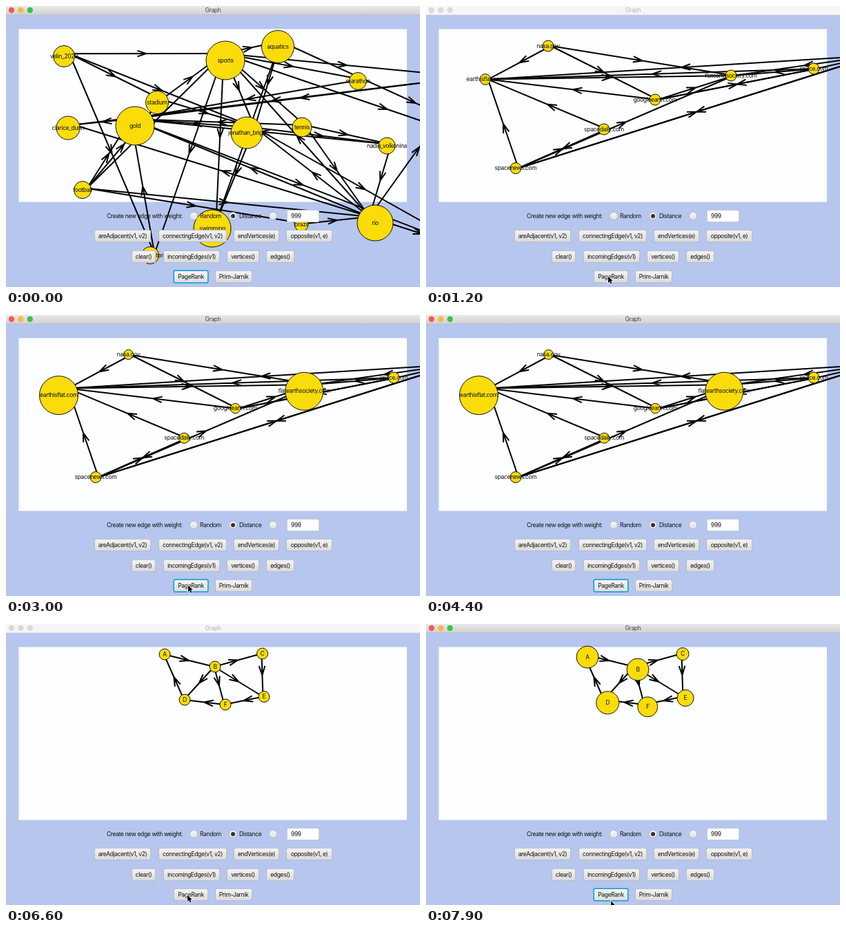
Write an HTML page with a canvas that moves like this. It is 600 px wide and 408 px high and loops after 8 s.

```html
<!DOCTYPE html>
<html lang="en">
<head>
<meta charset="utf-8">
<title>Graph</title>
<style>
html, body { margin: 0; width: 100%; height: 100%; overflow: hidden; background: #b6c6ee; }
canvas { display: block; width: 600px; height: 408px; }
</style>
</head>
<body>
<canvas id="stage"></canvas>
<script>
const W = 600, H = 408, LOOP = 8000, TAU = Math.PI * 2;
const canvas = document.getElementById('stage');
const ctx = canvas.getContext('2d');
const ratio = window.devicePixelRatio || 1;
canvas.width = W * ratio;
canvas.height = H * ratio;

// Node: label, x, y, radius, then optionally the radius once ranked.
// Nodes without a radius lie outside the window.
const sportsWeb = {
  nodes: {
    games: ['velin_2020', 84, 73, 15.5], sports: ['sports', 318, 79, 28],
    aquatics: ['aquatics', 394, 59, 23.5], marathon: ['marathon', 510, 109, 12.5],
    stadium: ['stadium', 219, 140, 16.5], gold: ['gold', 187, 174, 28],
    gymnast: ['clarice_dunn', 90, 177, 17], swimmer: ['jonathan_brigs', 349, 184, 23],
    tennis: ['tennis', 429, 176, 14], player: ['nadia_volkonina', 552, 203, 12],
    football: ['football', 111, 267, 12.5], swimming: ['swimming', 299, 323, 27],
    brazil: ['brazil', 428, 317, 10], rio: ['rio', 535, 315, 26],
    court: ['badminton', 209, 362, 12.5],
    p: ['', 672, 103], q: ['', 790, 231], s: ['', 680, 356]
  },
  edges: `games>sports games>stadium games>swimmer games>court stadium>swimmer
    stadium>sports football>stadium football>gold football>sports football>rio
    football>brazil court>gold sports>court sports>swimming sports>aquatics
    aquatics>swimming aquatics>swimmer swimmer>swimming gold>gymnast rio>gymnast
    p>gold p>gymnast swimmer>gold tennis>gold player>gold tennis>player
    swimmer>player rio>gold gold>s rio>sports sports>swimmer sports>tennis
    sports>marathon sports>p sports>q aquatics>q marathon>gold rio>swimmer
    swimmer>s tennis>rio player>rio rio>p rio>s brazil>rio`
};

const spaceWeb = {
  nodes: {
    nasa: ['nasa.gov', 177, 58, 8, 7], earth: ['earthisflat.com', 86, 106.5, 7.8, 28],
    google: ['googleearth.com', 332, 136, 8, 7.2],
    flat: ['flatearthsociety.com', 442, 101, 8, 27.5],
    space: ['space.com', 562, 91, 8], daily: ['spacedaily.com', 258, 179, 8, 7.5],
    news: ['spacenews.com', 130, 235.5, 8], x: ['', 650, 72]
  },
  edges: `nasa>earth nasa>flat nasa>google google>earth google>flat google>space
    space>google daily>earth news>flat news>daily daily>news news>earth news>x
    x>news x>earth space>earth earth>flat space>flat x>flat x>space`
};

const letters = {
  nodes: {
    A: ['A', 230, 44, 8, 16], B: ['B', 303, 62, 8, 16], C: ['C', 371.5, 43, 8, 9],
    D: ['D', 259, 110, 8, 16.5], E: ['E', 374, 105.5, 8, 12], F: ['F', 318, 117, 8, 14.5]
  },
  edges: 'A>B B>C B>D B>E B>F C>E E>F F>D D>A'
};

// Button: label, left, top, width
const buttons = [
  ['areAdjacent(v1, v2)', 128, 325, 82], ['connectingEdge(v1, v2)', 221, 325, 99],
  ['endVertices(e)', 330, 325, 66], ['opposite(v1, e)', 406, 325, 67],
  ['clear()', 182, 355, 35], ['incomingEdges(v1)', 228, 355, 82],
  ['vertices()', 320, 355, 47], ['edges()', 377, 355, 41],
  ['PageRank', 243, 384, 50], ['Prim-Jarnik', 303, 384, 54]
];

const clamp = v => Math.max(0, Math.min(1, v));
const progress = (t, from, to) => clamp((t - from) / (to - from));
const mix = (a, b, p) => a + (b - a) * p;

function text(str, x, y, align = 'center', color = '#111') {
  ctx.textAlign = align;
  ctx.fillStyle = color;
  ctx.fillText(str, x, y);
}

function disc(x, y, r, fill, stroke, width = 1) {
  ctx.beginPath();
  ctx.arc(x, y, r, 0, TAU);
  ctx.fillStyle = fill;
  ctx.fill();
  if (stroke) {
    ctx.strokeStyle = stroke;
    ctx.lineWidth = width;
    ctx.stroke();
  }
}

function box(x, y, w, h, r, fill) {
  ctx.beginPath();
  ctx.roundRect(x, y, w, h, r);
  ctx.fillStyle = fill;
  ctx.fill();
}

function shade(y, h, top, bottom) {
  const g = ctx.createLinearGradient(0, y, 0, y + h);
  g.addColorStop(0, top);
  g.addColorStop(1, bottom);
  return g;
}

function edge([x1, y1], [x2, y2]) {
  const mx = (x1 + x2) / 2, my = (y1 + y2) / 2;
  const dir = Math.atan2(y2 - y1, x2 - x1);
  ctx.beginPath();
  ctx.moveTo(x1, y1);
  ctx.lineTo(x2, y2);
  for (const turn of [-0.31, 0.31]) {
    ctx.moveTo(mx, my);
    ctx.lineTo(mx - 14 * Math.cos(dir + turn), my - 14 * Math.sin(dir + turn));
  }
  ctx.stroke();
}

// Each circle and label share a pane as wide as the wider of the two.
const halfPane = (half, r) => Math.max(half, r);
const halfLabel = label => ctx.measureText(label).width / 2;

// Lines keep the place they had before the circles grew.
function anchor([label, x, y, r]) {
  if (!r) return [x, y];
  const half = halfLabel(label);
  return [x + r / 2 + half - halfPane(half, r), y - r / 2 + 4];
}

function place([label, x, y, r0, r1 = r0], rank) {
  const r = mix(r0, r1, rank), half = halfLabel(label), grown = (r - r0) / 2;
  return { label, r, x: x - grown + halfPane(half, r) - halfPane(half, r0), y: y + grown };
}

function drawGraph({ nodes, edges }, rank) {
  ctx.strokeStyle = '#000';
  ctx.lineWidth = 2;
  for (const pair of edges.trim().split(/\s+/)) {
    const [a, b] = pair.split('>');
    edge(anchor(nodes[a]), anchor(nodes[b]));
  }
  const placed = Object.values(nodes).filter(n => n[3]).map(n => place(n, rank));
  for (const n of placed) disc(n.x, n.y, n.r, '#fadc0a', '#111');
  for (const n of placed) text(n.label, n.x, n.y);
}

function drawTitle(active) {
  ctx.fillStyle = active ? shade(0, 13, '#e9e8e9', '#d2d1d2') : '#f6f6f6';
  ctx.fillRect(0, 0, W, 13);
  ctx.fillStyle = active ? '#b9b9bd' : '#dcdce0';
  ctx.fillRect(0, 12.5, W, 0.7);
  const lights = active ? ['#f25b55', '#f6bb3c', '#35c548'] : ['#dadada', '#dadada', '#dadada'];
  lights.forEach((c, i) => disc(8 + i * 13.4, 6, 4.2, c));
  text('Graph', 300, 6.5, 'center', active ? '#444' : '#b4b4b4');
}

function drawControls(focused) {
  text('Create new edge with weight:', 146, 305, 'left');
  for (const x of [272, 329, 387])
    disc(x, 305, 5.6, shade(299, 12, '#f8f8f8', '#dedede'), '#b2b4bb', 0.8);
  disc(329, 305, 3, '#333');
  text('Random', 281, 305.5, 'left');
  text('Distance', 338, 305.5, 'left');
  box(407, 296, 47, 18, 2, '#b8bcc8');
  box(407.7, 296.7, 45.6, 16.6, 1.5, '#fff');
  text('999', 413, 305, 'left');
  for (const [label, x, y, w] of buttons) {
    if (focused && label === 'PageRank') {
      box(x - 0.7, y - 0.7, w + 1.4, 19.4, 3, '#23a3cf');
      box(x + 1, y + 1, w - 2, 16, 1.5, shade(y, 18, '#f6f6f6', '#dddddd'));
    } else {
      box(x, y, w, 18, 2.5, '#b0b2ba');
      box(x + 0.8, y + 0.8, w - 1.6, 16.4, 2, shade(y, 18, '#f5f5f5', '#dadada'));
    }
    text(label, x + w / 2, y + 9.2);
  }
}

function drawCursor(x, y) {
  ctx.save();
  ctx.translate(x, y);
  ctx.beginPath();
  [[0, 0], [0, 9.5], [2.2, 7.5], [3.7, 11], [5.4, 10.2], [3.9, 6.9], [6.8, 6.8]]
    .forEach(([px, py]) => ctx.lineTo(px, py));
  ctx.closePath();
  ctx.strokeStyle = '#fff';
  ctx.lineWidth = 1.4;
  ctx.stroke();
  ctx.fillStyle = '#000';
  ctx.fill();
  ctx.restore();
}

function cursorAt(t) {
  if (t < 4900) {
    const away = 1 - progress(t, 500, 1000) + progress(t, 3300, 3700);
    return [264 + 12 * away, 392.5 + 20 * away];
  }
  const away = 1 - progress(t, 6000, 6500);
  const leave = progress(t, 7500, 7900);
  return [263 + 12 * away + 5 * leave, 393.5 + 20 * away + 8.5 * leave];
}

function draw(t) {
  ctx.setTransform(ratio, 0, 0, ratio, 0, 0);
  ctx.font = '8.5px Inter, sans-serif';
  ctx.letterSpacing = '-0.35px';
  ctx.textBaseline = 'middle';
  ctx.fillStyle = '#b6c6ee';
  ctx.fillRect(0, 0, W, H);
  ctx.fillStyle = '#fdfeff';
  ctx.fillRect(18.5, 33.5, 562.5, 251);

  const active = t < 100 || (t >= 1500 && t < 4900) || t >= 6800;
  if (t < 100) drawGraph(sportsWeb, 0);
  else if (t < 4900) drawGraph(spaceWeb, progress(t, 1500, 2700));
  else drawGraph(letters, progress(t, 6800, 7900) ** 0.7);

  drawTitle(active);
  drawControls(active);
  if (t >= 100) drawCursor(...cursorAt(t));
}

const start = performance.now();
function tick() {
  const t = (performance.now() - start) % LOOP;
  draw(Math.floor(t / 100) * 100);
  requestAnimationFrame(tick);
}
tick();
</script>
</body>
</html>
```
